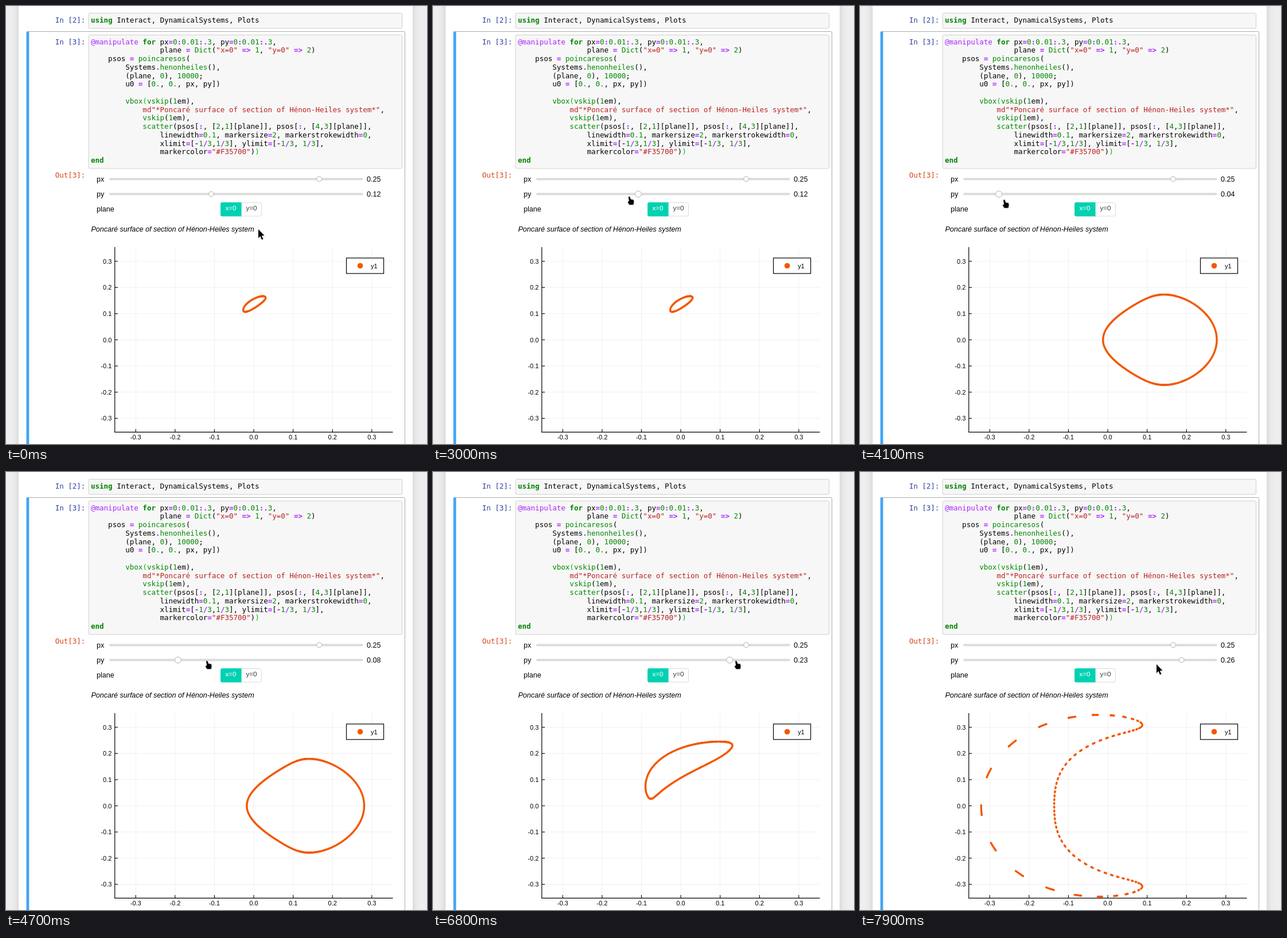
Animation, 734 px wide and 763 px high, one loop 8 s. Source, as an HTML page with a canvas:

```html
<!DOCTYPE html>
<html lang="en">
<head>
<meta charset="utf-8">
<title>Poincaré section explorer</title>
<style>
html, body { margin: 0; width: 734px; height: 763px; overflow: hidden; background: #eee; }
canvas { display: block; }
</style>
</head>
<body>
<canvas id="stage" width="734" height="763"></canvas>
<script>
const W = 734, H = 763, LOOP = 8000, STEP = 100;
const ctx = document.getElementById('stage').getContext('2d');
const SANS = '"Liberation Sans", Arial, sans-serif';
const MONO = '12.5px "DejaVu Sans Mono", monospace';
const CHAR_W = 7.53, LINE_H = 14.76;
const ORANGE = '#F35700';

const CODE = [
  '@manipulate for px=0:0.01:.3, py=0:0.01:.3,',
  '                plane = Dict("x=0" => 1, "y=0" => 2)',
  '    psos = poincaresos(',
  '        Systems.henonheiles(),',
  '        (plane, 0), 10000;',
  '        u0 = [0., 0., px, py])',
  '',
  '        vbox⟨vskip(1em),',
  '            md"*Poncaré surface of section of Hénon-Heiles system*",',
  '            vskip(1em),',
  '            scatter(psos[:, [2,1][plane]], psos[:, [4,3][plane]],',
  '                linewidth=0.1, markersize=2, markerstrokewidth=0,',
  '                xlimit=[-1/3,1/3], ylimit=[-1/3, 1/3],',
  '                markercolor="#F35700")⟩',
  'end'
];

// Token rules: pattern, colour, bold
const RULES = [
  [/^(md)?"[^"]*"/, '#BA2121'],
  [/^@\w+/, '#AA22FF'],
  [/^(using|for|end)\b/, '#008000', true],
  [/^[A-Za-z]\w*(?=[(⟨])/, '#008800'],
  [/^[A-Za-z]\w*/, '#000'],
  [/^(\d+\.?\d*|\.\d+)/, '#008800'],
  [/^[=<>:\/.-]+/, '#AA22FF', true],
  [/^[⟨⟩]/, '#00BB00'],
  [/^ +/, null],
  [/^./, '#000']
];

// Time tables: [ms, value in hundredths]
const SHOWN = [[0, 12], [3100, 11], [3200, 10], [3300, 8], [3400, 7], [3500, 6], [3600, 5],
  [3900, 4], [4400, 5], [4600, 7], [4700, 8], [4800, 10], [4900, 11], [5000, 13], [5100, 14],
  [5300, 15], [5600, 16], [5900, 17], [6100, 18], [6300, 19], [6500, 21], [6700, 22],
  [6800, 23], [6900, 24], [7000, 25], [7200, 26]];
const PLOTTED = [[0, 12], [3200, 11], [3400, 10], [3600, 8], [3700, 7], [3900, 6], [4100, 5],
  [4300, 4], [4500, 5], [4700, 6], [4800, 7], [4900, 8], [5100, 10], [5300, 11], [5400, 12],
  [5500, 13], [5600, 14], [5700, 15], [5800, 16], [6100, 17], [6300, 18], [6500, 20],
  [6700, 21], [6800, 22], [7000, 23], [7100, 24], [7200, 25], [7400, 26]];
// Pointer path: [ms, x, y]
const POINTER = [[0, 440, 389], [300, 440, 389], [1100, 360, 331], [1400, 360, 331],
  [1700, 357, 331], [2900, 357, 331], [3600, 250, 338], [3700, 246, 340], [3800, 246, 340],
  [3900, 240, 339], [4300, 262, 336], [4700, 350, 329], [5100, 380, 328], [5200, 380, 328],
  [5600, 443, 327], [6100, 470, 328], [6200, 470, 328], [6800, 528, 329], [7200, 555, 329],
  [7400, 558, 329], [7600, 558, 329], [7900, 517, 335]];

const plotX = v => 432 + v * 686;
const plotY = v => 581.5 - v * 456;
const sliderX = n => 184.1 + n * 14.48;
const stepAt = (table, t) => table.filter(k => k[0] <= t).pop()[1];

function pathAt(keys, t) {
  const i = keys.findIndex(k => k[0] > t);
  if (i < 0) return keys[keys.length - 1].slice(1);
  const [t0, x0, y0] = keys[i - 1], [t1, x1, y1] = keys[i];
  const f = (t - t0) / (t1 - t0);
  return [x0 + (x1 - x0) * f, y0 + (y1 - y0) * f];
}

function text(g, str, x, y, font, color, align = 'left') {
  g.font = font;
  g.fillStyle = color;
  g.textAlign = align;
  g.fillText(str, x, y);
}

function line(g, x0, y0, x1, y1, color, width) {
  g.strokeStyle = color;
  g.lineWidth = width;
  g.beginPath();
  g.moveTo(x0, y0);
  g.lineTo(x1, y1);
  g.stroke();
}

function box(g, x, y, w, h, r, fill, stroke) {
  g.beginPath();
  g.roundRect(x, y, w, h, r);
  g.fillStyle = fill;
  g.fill();
  if (!stroke) return;
  g.strokeStyle = stroke;
  g.lineWidth = 1;
  g.stroke();
}

function codeLine(g, src, x, y) {
  let col = 0;
  while (col < src.length) {
    const rest = src.slice(col);
    const [re, color, bold] = RULES.find(r => r[0].test(rest));
    const token = rest.match(re)[0];
    const glyphs = token.replace('⟨', '(').replace('⟩', ')');
    if (color) text(g, glyphs, x + col * CHAR_W, y, (bold ? 'bold ' : '') + MONO, color);
    col += token.length;
  }
}

function drawAxes(g) {
  const font = '11px ' + SANS;
  for (let i = -3; i <= 3; i++) {
    const x = plotX(i / 10), y = plotY(i / 10), label = (i / 10).toFixed(1);
    line(g, x, 420, x, 742, 'rgba(0,0,0,.06)', 1);
    line(g, 190, y, 674, y, 'rgba(0,0,0,.06)', 1);
    line(g, x, 742, x, 737, '#000', 1.1);
    line(g, 190, y, 195, y, '#000', 1.1);
    text(g, label, x, 754.5, font, '#000', 'center');
    text(g, label, 184.3, y + 4, font, '#000', 'right');
  }
  line(g, 189.7, 420, 189.7, 743, '#000', 1.2);
  line(g, 189, 742.4, 674.5, 742.4, '#000', 1.2);
}

function drawLegend(g) {
  g.fillStyle = '#fff';
  g.strokeStyle = '#000';
  g.lineWidth = 1.2;
  g.fillRect(593.5, 439, 65, 27);
  g.strokeRect(593.5, 439, 65, 27);
  g.fillStyle = ORANGE;
  g.beginPath();
  g.arc(617.5, 452.5, 4.8, 0, 7);
  g.fill();
  text(g, 'y1', 636, 457, '11px ' + SANS, '#000');
}

function makePage() {
  const page = document.createElement('canvas');
  page.width = W;
  page.height = H;
  const g = page.getContext('2d');
  g.fillStyle = '#eee';
  g.fillRect(0, 0, W, H);
  g.save();
  g.shadowColor = 'rgba(87,87,87,.25)';
  g.shadowBlur = 11;
  g.fillStyle = '#fff';
  g.fillRect(22, -30, 687, H + 60);
  g.restore();

  box(g, 144, 12.5, 546.5, 26.5, 2, '#f7f7f7', '#cfcfcf');
  box(g, 144, 50.5, 546.5, 232.5, 2, '#f7f7f7', '#cfcfcf');
  text(g, 'In [2]:', 85.7, 29, MONO, '#303F9F');
  text(g, 'In [3]:', 85.7, 66.5, MONO, '#303F9F');
  text(g, 'Out[3]:', 85.7, 299, MONO, '#D84315');
  codeLine(g, 'using Interact, DynamicalSystems, Plots', 148, 29);
  CODE.forEach((src, i) => codeLine(g, src, 148, 66.5 + i * LINE_H));

  const font = '12.5px ' + SANS;
  text(g, 'px', 158, 306, font, '#000');
  text(g, 'py', 158, 332, font, '#000');
  text(g, 'plane', 158, 358, font, '#000');
  text(g, '0.25', 629, 306, font, '#000');
  for (const y of [301.4, 327.6]) box(g, 180, y - 2, 442.5, 4, 2, '#dbdbdb');

  box(g, 410, 342.5, 35.5, 23.5, [0, 3, 3, 0], '#fff', '#dbdbdb');
  box(g, 374, 342, 36.5, 24.5, [3, 0, 0, 3], '#00d1b2');
  text(g, 'x=0', 392, 356, '11.6px ' + SANS, '#fff', 'center');
  text(g, 'y=0', 428, 356, '11.6px ' + SANS, '#363636', 'center');
  text(g, 'Poncaré surface of section of Hénon-Heiles system', 148.5, 393, 'italic ' + font, '#000');
  drawAxes(g);
  return page;
}

// Crossings of x = 0 with growing x, integrated by fourth-order Runge-Kutta
function section(py) {
  const path = new Path2D(), h = 0.05;
  let x = 0, y = 0, u = 0.25, v = py;
  const dot = (a, b) => {
    const cx = plotX(a), cy = plotY(b);
    path.moveTo(cx + 1.8, cy);
    path.arc(cx, cy, 1.8, 0, 2 * Math.PI);
  };
  dot(y, v);
  const ax = (a, b) => -a - 2 * a * b;
  const ay = (a, b) => -b - a * a + b * b;
  for (let n = 0; n < 10000 / h; n++) {
    const a1 = ax(x, y), b1 = ay(x, y);
    const u2 = u + h / 2 * a1, v2 = v + h / 2 * b1, x2 = x + h / 2 * u, y2 = y + h / 2 * v;
    const a2 = ax(x2, y2), b2 = ay(x2, y2);
    const u3 = u + h / 2 * a2, v3 = v + h / 2 * b2, x3 = x + h / 2 * u2, y3 = y + h / 2 * v2;
    const a3 = ax(x3, y3), b3 = ay(x3, y3);
    const u4 = u + h * a3, v4 = v + h * b3, x4 = x + h * u3, y4 = y + h * v3;
    const nx = x + h / 6 * (u + 2 * u2 + 2 * u3 + u4);
    const ny = y + h / 6 * (v + 2 * v2 + 2 * v3 + v4);
    const nu = u + h / 6 * (a1 + 2 * a2 + 2 * a3 + ax(x4, y4));
    const nv = v + h / 6 * (b1 + 2 * b2 + 2 * b3 + ay(x4, y4));
    if (x < 0 && nx >= 0) {
      const f = x / (x - nx);
      dot(y + f * (ny - y), v + f * (nv - v));
    }
    x = nx; y = ny; u = nu; v = nv;
  }
  return path;
}

function drawFrame(editing) {
  const edge = editing ? '#66BB6A' : '#ababab';
  ctx.beginPath();
  ctx.roundRect(36.5, 44.5, 659, H, 2);
  ctx.strokeStyle = edge;
  ctx.lineWidth = 1;
  ctx.stroke();
  ctx.fillStyle = editing ? '#66BB6A' : '#42A5F5';
  ctx.fillRect(35.5, 44.5, 4.8, H);
}

function drawThumb(x, y, r) {
  ctx.beginPath();
  ctx.arc(x, y, r, 0, 7);
  ctx.fillStyle = '#fff';
  ctx.fill();
  ctx.strokeStyle = '#b0b0b0';
  ctx.lineWidth = 1;
  ctx.stroke();
}

const ARROW = new Path2D('M0 0V15.2L3.4 12.1L6 18L8.4 17L5.8 11.2L10.3 10.8Z');
const HAND = new Path2D('M-1 .6Q.3-.6 1.5 .8L3.2 5L7 5.6Q8.4 6 8.4 8V11L7.5 14.3H.6L-1.8 10.4Q-2.4 8.3-.6 8.2L.2 8.6Z');

function drawPointer(x, y, shape) {
  ctx.save();
  ctx.translate(x, y);
  ctx.shadowColor = 'rgba(0,0,0,.3)';
  ctx.shadowBlur = 2;
  ctx.lineJoin = 'round';
  ctx.lineWidth = 1.6;
  ctx.strokeStyle = '#fff';
  ctx.stroke(shape);
  ctx.shadowColor = 'transparent';
  ctx.fillStyle = '#000';
  ctx.fill(shape);
  ctx.restore();
}

const page = makePage();
const sections = {};
for (const [, n] of PLOTTED) sections[n] ??= section(n / 100);

function draw(t) {
  const editing = t >= 100 && t < 3000;
  const dragging = t >= 3000 && t < 7700;
  const caret = editing && (t < 600 || (t >= 1100 && t < 1600) || t >= 2200);
  const shown = stepAt(SHOWN, t);

  ctx.drawImage(page, 0, 0);
  drawFrame(editing);
  if (caret) line(ctx, 443, 247, 443, 262, '#000', 1.4);
  drawThumb(sliderX(25), 301.4, 4.4);
  drawThumb(sliderX(shown), 327.6, dragging ? 5.4 : 4.4);
  text(ctx, (shown / 100).toFixed(2), 629, 332, '12.5px ' + SANS, '#000');
  ctx.fillStyle = ORANGE;
  ctx.fill(sections[stepAt(PLOTTED, t)]);
  drawLegend(ctx);
  drawPointer(...pathAt(POINTER, t), t >= 1500 && t < 7700 ? HAND : ARROW);
}

const start = performance.now();
let last = -1;
function tick(now) {
  const t = Math.floor(Math.max(0, now - start) % LOOP / STEP) * STEP;
  if (t !== last) draw(last = t);
  requestAnimationFrame(tick);
}
draw(0);
requestAnimationFrame(tick);
</script>
</body>
</html>
```
